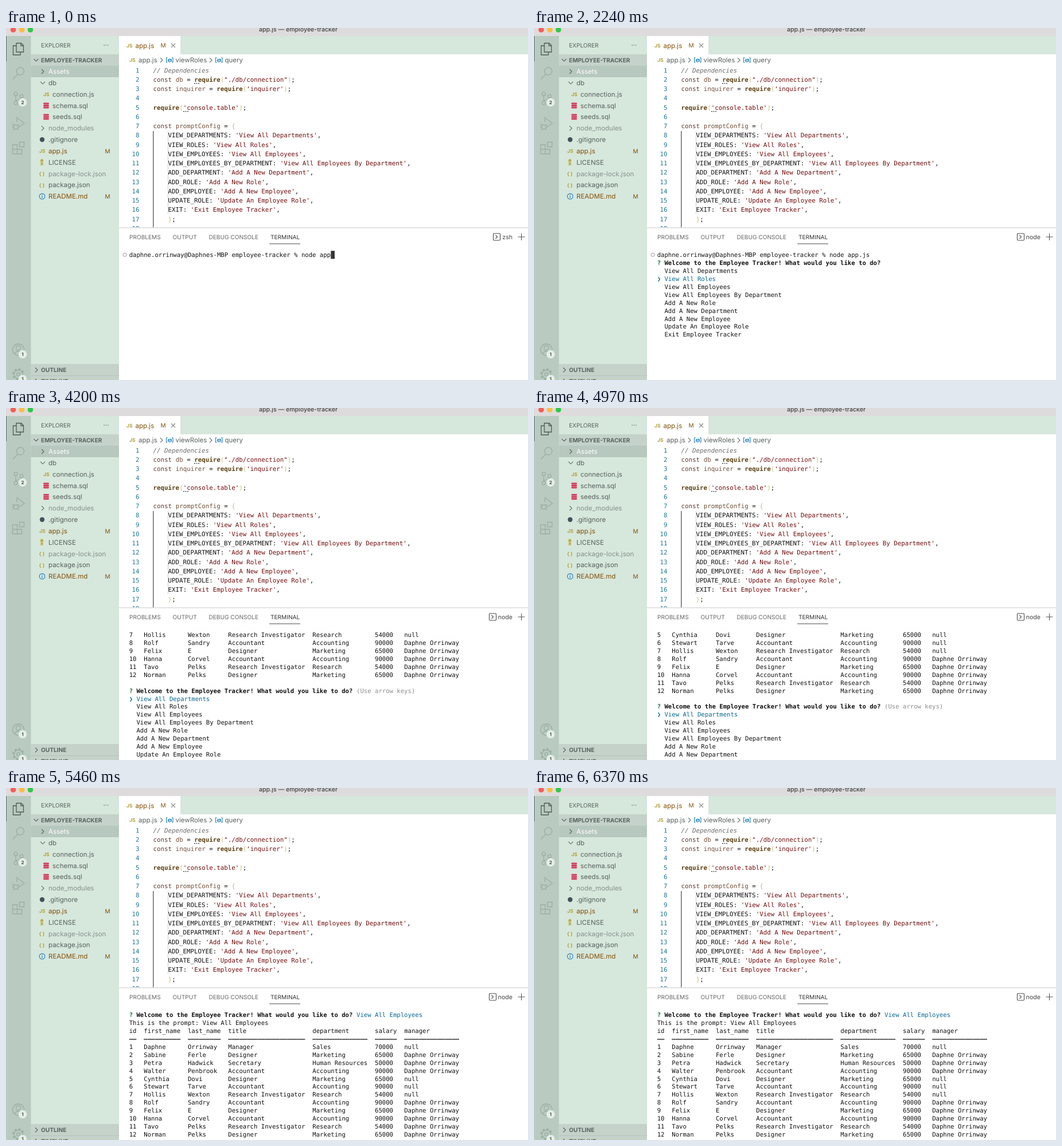
An HTML page that plays this animation: 910 by 615 pixels, repeating every 6720 ms.

```html
<!DOCTYPE html>
<html lang="en">
<head>
<meta charset="utf-8">
<title>Employee tracker</title>
<style>
  html, body { margin: 0; width: 100%; height: 100%; overflow: hidden; background: #fff; }
  svg { display: block; }
  text { font-family: Inter, Roboto, sans-serif; font-size: 11.5px; fill: #58625d; text-rendering: geometricPrecision; }
  .caps { font-size: 10.1px; }
  .bold { font-weight: 700; }
  .badge { font-size: 8px; font-weight: 600; fill: #2e3a33; text-anchor: middle; }
  .js { font-size: 8.6px; font-weight: 700; fill: #b3a238; }
  .muted { fill: #87928c; }
  .modified { fill: #824f08; }
  .light { fill: #fff; }
  .end { text-anchor: end; }
  .code, .term { font-family: "DejaVu Sans Mono", "Liberation Mono", monospace; fill: #111; }
  .code { font-size: 10.8px; }
  .term { font-size: 10.61px; }
  .number { fill: #237893; }
  .comment { fill: #6c6c6c; font-style: italic; }
  .keyword { fill: #623a32; }
  .name { fill: #74503c; }
  .call { fill: #5c4010; font-weight: 700; }
  .string { fill: #720d0d; }
  .bracket { fill: #c9bb7c; }
  .ask { fill: #16733c; font-weight: 700; }
  .pick { fill: #066791; }
  .hint { fill: #8c8c8c; }
  .icon { fill: none; stroke: #9bafa3; stroke-width: 1.3; }
  .chevron { fill: none; stroke: #5b6660; stroke-width: 1.1; }
  .symbol { fill: none; stroke: #1f7fc0; stroke-width: 1.1; }
</style>
</head>
<body>
<svg id="stage" width="910" height="615" viewBox="0 0 910 615">
  <defs>
    <clipPath id="editorClip"><path d="M197 46H910V348.5H197z"/></clipPath>
    <clipPath id="termClip"><path d="M197 387H910V615H197z"/></clipPath>
  </defs>
  <path fill="#fff" d="M0 0H910V615H0z"/>
  <path fill="#d6e7dc" d="M43 14H910V46H43zM43 46H197V615H43z"/>
  <path fill="#b9cac0" d="M0 14H43.500V615H0z"/>
  <path fill="#dddbdc" d="M0 0H910V14H0z"/>
  <path fill="#fff" d="M197 14H304V47H197z"/>
  <path fill="#c4d2ca" d="M43.500 46H197V66H43.500zM43.500 587H197V615H43.500z"/>
  <path fill="#b7c8be" d="M43.500 66H197V86H43.500z"/>
  <path stroke="#b3c2b9" d="M44 607.500H197"/>
  <path fill="#5f7066" d="M0 14H1V58H0z"/>
  <circle cx="12.500" cy="3" r="4.800" fill="#fb5c56"/>
  <circle cx="27.500" cy="3" r="4.800" fill="#fcbc3f"/>
  <circle cx="42.500" cy="3" r="4.800" fill="#33c748"/>

  <g class="icon">
    <path stroke="#4d5d53" d="M18 26.500H26.500L30.500 30.500V42H18zM18 31H12.500V47H25V42M26 26.500V31H30.500"/>
    <circle cx="25" cy="75.500" r="6.500"/><path d="M20.500 80.500L12 89.500"/>
    <circle cx="17" cy="115" r="2.900"/><circle cx="17" cy="131" r="2.900"/><circle cx="27" cy="119" r="2.900"/>
    <path d="M17 118V128M27 122C26 126 20 124 17.500 127.500"/>
    <path d="M19 164V156.500L32 166.500L23 173M13.500 169.500H20.500V174.500Q17 180 13.500 174.500zM11 168L13.500 170.500M23 168L20.500 170.500M10.500 173H13M21 173H23.500M11.500 178L14 176M22.500 178L20 176"/>
    <path d="M11.500 204H19.500V212H27.500V220H11.500zM11.500 212H19.500V220M23.500 199.500H31.500V207.500H23.500z"/>
    <circle cx="21.500" cy="562" r="10"/><circle cx="21.500" cy="559" r="4"/><path d="M14.500 569Q21.500 560 28.500 569"/>
    <circle cx="21.500" cy="605" r="7.500"/><circle cx="21.500" cy="605" r="2.800"/>
    <circle cx="21.500" cy="605" r="9" stroke-width="3" stroke-dasharray="3.530 3.530"/>
  </g>
  <g id="chrome"></g>

  <g clip-path="url(#editorClip)">
    <path stroke="#444" stroke-width="1.200" d="M256.800 180V349"/>
    <path stroke="#c9cdd6" d="M282.500 180V325"/>
    <g id="editor"></g>
    <g fill="#555"><path d="M328 96h2v1.500h-2zM331.500 96h2v1.500h-2zM335 96h2v1.500h-2zM309 145h2v1.500h-2zM312.500 145h2v1.500h-2zM316 145h2v1.500h-2z"/></g>
  </g>
  <path stroke="#c9c9c9" d="M197 349H910"/>
  <path stroke="#4a4a4a" d="M459 377H513"/>
  <g id="shell">
    <path fill="none" stroke="#4a4a4a" stroke-width="1.100" d="M-12 -6H-1.500Q0 -6 0 -4.500V4.500Q0 6 -1.500 6H-10.500Q-12 6 -12 4.500V-4.500Q-12 -6 -10.500 -6M-8 -3L-5 0L-8 3"/>
  </g>
  <path stroke="#555" stroke-width="1.100" d="M892.500 365H904.500M898.500 359V371"/>
  <g clip-path="url(#termClip)"><g id="terminal"></g></g>
</svg>
<script>
const LOOP = 6720;
const $ = id => document.getElementById(id);

function el(parent, tag, attrs, content) {
  const node = document.createElementNS('http://www.w3.org/2000/svg', tag);
  for (const key in attrs) node.setAttribute(key, attrs[key]);
  if (content !== undefined) node.textContent = content;
  return parent.appendChild(node);
}
// y is the middle of the capital letters
const label = (x, y, content, cls = '', parent = chrome) =>
  el(parent, 'text', { x, y: y + (/caps/.test(cls) ? 3.7 : 4.1), class: cls }, content);

// Each run of words sits on the character grid.
function monoLine(parent, cls, x, y, cell, segments) {
  const line = el(parent, 'text', { class: cls, y });
  let col = 0;
  for (const [content, kind = ''] of segments) {
    for (const run of content.matchAll(/\S+(?: \S+)*/g))
      el(line, 'tspan', { x: x + (col + run.index) * cell, class: kind }, run[0]);
    col += content.length;
  }
}

// Window, side bar and tabs
const chrome = $('chrome');
const chevron = (x, y, open) => el(chrome, 'path', {
  class: 'chevron',
  d: open ? `M${x - 4} ${y - 2}l4 4l4 -4` : `M${x - 2} ${y - 4}l4 4l-4 4`
});
const badge = (y, n) => {
  el(chrome, 'circle', { cx: 29, cy: y, r: 7.3, fill: '#e2eee6' });
  el(chrome, 'text', { x: 29, y: y + 3, class: 'badge' }, n);
};
badge(130, 2); badge(570, 1); badge(613, 1);

const title = label(441, 1.9, 'app.js — employee-tracker');
title.style.cssText = 'font-size:10.6px;font-weight:500;fill:#444';
label(61, 30.5, 'EXPLORER', 'caps');
label(169.5, 29.5, '···');
chevron(52.5, 56, true);  label(61, 56, 'EMPLOYEE-TRACKER', 'caps bold');
chevron(53, 597.5);       label(61, 597.5, 'OUTLINE', 'caps bold');
chevron(53, 617);         label(61, 617, 'TIMELINE', 'caps bold');

const icons = {
  closed: (x, y) => chevron(x - 1, y),
  open: (x, y) => chevron(x - 1, y, true),
  js: (x, y) => el(chrome, 'text', { x: x - 5, y: y + 3.2, class: 'js' }, 'JS'),
  sql: (x, y) => {
    for (const dy of [-3.5, 0, 3.5])
      el(chrome, 'rect', { x: x - 5, y: y + dy - 1.5, width: 10, height: 2.9, rx: 1.4, fill: '#d43b5c' });
  },
  git: (x, y) => el(chrome, 'circle', { cx: x - 2, cy: y, r: 4.2, fill: '#41535b' }),
  license: (x, y) => {
    el(chrome, 'circle', { cx: x - 2.5, cy: y - 3, r: 2.7, fill: '#bfae50' });
    el(chrome, 'path', { d: `M${x - 4.500} ${y}v6l2 -2l2 2v-6z`, fill: '#bfae50' });
  },
  json: (x, y) => el(chrome, 'text', { x: x - 7.5, y: y + 3.4, class: 'js' }, '{ }'),
  info: (x, y) => {
    el(chrome, 'circle', { cx: x - 2, cy: y, r: 4.8, class: 'symbol' });
    el(chrome, 'path', { d: `M${x - 2} ${y - 1}v4M${x - 2} ${y - 3.200}v1.300`, class: 'symbol' });
  }
};
[
  ['Assets', 'closed', 'light'], ['db', 'open'],
  ['connection.js', 'js', '', 1], ['schema.sql', 'sql', '', 1], ['seeds.sql', 'sql', '', 1],
  ['node_modules', 'closed', 'muted'], ['.gitignore', 'git'], ['app.js', 'js', 'modified'],
  ['LICENSE', 'license'], ['package-lock.json', 'json', 'muted'],
  ['package.json', 'json'], ['README.md', 'info', 'modified']
].forEach(([name, icon, cls = '', nested = 0], i) => {
  const y = 76 + i * 19.83;
  icons[icon](nested ? 70 : 65 - (icon === 'js' ? 2 : 0), y);
  label(nested ? 81 : 74, y, name, cls);
  if (cls === 'modified') label(172.5, y, 'M', cls + ' caps');
});

icons.js(215, 30.5);
label(225.5, 30.5, 'app.js', 'modified');
label(269.5, 30.5, 'M', 'modified caps');
el(chrome, 'path', { class: 'chevron', opacity: .75, d: 'M288 27l7 7m0 -7l-7 7' });
icons.js(220, 56.2);
label(231, 56.2, 'app.js');
for (const [x, name] of [[271, 'viewRoles'], [357, 'query']]) {
  chevron(x, 56.2);
  el(chrome, 'path', { class: 'symbol', d: `M${x + 10.500} 52h-2v8h2M${x + 18} 52h2v8h-2M${x + 11.500} 55.500l3.500 -1.500l2.500 1.300v2.500l-3.500 1.500l-2.500 -1.300zl2.500 1.200l3.500 -1.500` });
  label(x + 24.5, 56.2, name);
}
[[215, 'PROBLEMS'], [290.5, 'OUTPUT'], [353.5, 'DEBUG CONSOLE'], [461, 'TERMINAL']]
  .forEach(([x, name]) => label(x, 365.5, name, 'caps').style.fill = name === 'TERMINAL' ? '#333' : '#666');

// Editor
const source = `// Dependencies
const db = require("./db/connection");
const inquirer = require('inquirer');

require('console.table');

const promptConfig = {
    VIEW_DEPARTMENTS: 'View All Departments',
    VIEW_ROLES: 'View All Roles',
    VIEW_EMPLOYEES: 'View All Employees',
    VIEW_EMPLOYEES_BY_DEPARTMENT: 'View All Employees By Department',
    ADD_DEPARTMENT: 'Add A New Department',
    ADD_ROLE: 'Add A New Role',
    ADD_EMPLOYEE: 'Add A New Employee',
    UPDATE_ROLE: 'Update An Employee Role',
    EXIT: 'Exit Employee Tracker',
    };
`.split('\n');
const grammar = [
  ['comment', /^\/\/.*/], ['string', /^(?:'[^']*'|"[^"]*")/], ['keyword', /^const\b/],
  ['call', /^require\b/], ['name', /^(?:db|inquirer|promptConfig)\b/], ['bracket', /^[(){}]/],
  ['', /^(?:\w+|\s+|.)/]
];
function tokenize(line) {
  const tokens = [];
  while (line) {
    const [kind, rule] = grammar.find(([, r]) => r.test(line));
    const word = line.match(rule)[0];
    tokens.push([word, kind]);
    line = line.slice(word.length);
  }
  return tokens;
}
source.forEach((line, i) => {
  const y = 77.7 + i * 16.25;
  el($('editor'), 'text', { x: 232.5, y, class: 'code number end' }, i + 1);
  monoLine($('editor'), 'code', 256.6, y, 6.505, tokenize(line));
});

// Terminal
const CELL = 6.393, ROW = 13.91, LEFT = 214.7, BASE = 400.3;
const boss = 'Daphne Orrinway';
const pad = (values, widths) => values.map((v, i) => String(v).padEnd(widths[i])).join('  ');
const widths = [2, 10, 9, 21, 15, 6, 15];
const jobs = {
  M: ['Manager', 'Sales', 70000], D: ['Designer', 'Marketing', 65000],
  S: ['Secretary', 'Human Resources', 50000], A: ['Accountant', 'Accounting', 90000],
  R: ['Research Investigator', 'Research', 54000]
};
const staff = [
  'Daphne Orrinway M', 'Sabine Ferle D *', 'Petra Hadwick S *', 'Walter Penbrook A *',
  'Cynthia Dovi D', 'Stewart Tarve A', 'Hollis Wexton R', 'Rolf Sandry A *',
  'Felix E D *', 'Hanna Corvel A *', 'Tavo Pelks R *', 'Norman Pelks D *'
].map((entry, i) => {
  const [first, last, job, managed] = entry.split(' ');
  return pad([i + 1, first, last, ...jobs[job], managed ? boss : 'null'], widths);
});
const table = [
  [[pad(['id', 'first_name', 'last_name', 'title', 'department', 'salary', 'manager'], widths)]],
  [[pad(widths.map(w => '–'.repeat(w)), widths), 'bold']],
  ...staff.map(row => [[row]])
];

const options = ['View All Departments', 'View All Roles', 'View All Employees',
  'View All Employees By Department', 'Add A New Role', 'Add A New Department',
  'Add A New Employee', 'Update An Employee Role', 'Exit Employee Tracker'];
const question = (content, kind) => [['?', 'ask'], [' '],
  ['Welcome to the Employee Tracker! What would you like to do?', 'bold'], [' '], [content, kind]];
const menu = (chosen, hint = '') => [question(hint, 'hint'),
  ...options.map((name, i) => i === chosen ? [['❯', 'pick'], [' '], [name, 'pick']] : [['  ' + name]])];
const hint = '(Use arrow keys)';
const prompt = 'daphne.orrinway@Daphnes-MBP employee-tracker % node ';
const command = [[prompt + 'app.js']];

const history = [
  [[pad(['Cynthia', 'Dovi', 'Marketing'], [10, 9, 0])]],
  [[pad(['Stewart', 'Tarve', 'Accounting'], [10, 9, 0])]],
  command, question(options[2], 'pick'), [['This is the prompt: ' + options[2]]],
  ...table, [['']], ...menu(0, hint)
];

const typed = word => ({ lines: [[[prompt + word]]], cursor: [prompt.length + word.length, 0], shell: 'zsh' });
const waiting = shell => ({ lines: [command], cursor: [0, 1], shell });
const asking = (chosen, note) => ({ lines: [command, ...menu(chosen, note)] });
const scrolled = top => ({ lines: history, top, mark: 2 });

const steps = [
  [0, typed('app')], [280, typed('app.')], [350, typed('app.j')], [560, typed('app.js')],
  [840, waiting('zsh')], [910, waiting('node')],
  [1400, asking(0, hint)], [2240, asking(1)], [2520, asking(2)],
  ...[[3080, 13], [4900, 12], [4970, 11], [5110, 9], [5180, 8], [5250, 6], [5320, 5], [5390, 4],
    [5460, 3], [5530, 2], [5600, 1], [5670, 0], [5880, 1], [6020, 2], [6160, 3]]
    .map(([time, top]) => [time, scrolled(top)])
];

const shellLabel = label(883, 365, '', 'end', $('stage'));
shellLabel.style.cssText = 'font-size:10.6px;fill:#444';

function draw({ lines, top = 0, mark = 0, cursor, shell = 'node' }) {
  const terminal = $('terminal');
  terminal.replaceChildren();
  lines.slice(top, top + 17).forEach((line, i) =>
    monoLine(terminal, 'term', LEFT, BASE + i * ROW, CELL, line));
  if (mark >= top)
    el(terminal, 'circle', { cx: 207, cy: 396.3 + (mark - top) * ROW, r: 3, fill: 'none', stroke: '#9a9a9a' });
  if (cursor)
    el(terminal, 'rect', { x: LEFT + cursor[0] * CELL, y: 389.3 + cursor[1] * ROW, width: 6.6, height: 14, fill: '#333' });
  shellLabel.textContent = shell;
  $('shell').setAttribute('transform', `translate(${shell === 'zsh' ? 861.5 : 854.5} 365)`);
}

let shown;
function tick() {
  const time = performance.now() % LOOP;
  const step = steps.findLast(([start]) => start <= time);
  if (step !== shown) draw((shown = step)[1]);
  requestAnimationFrame(tick);
}
tick();
</script>
</body>
</html>
```
